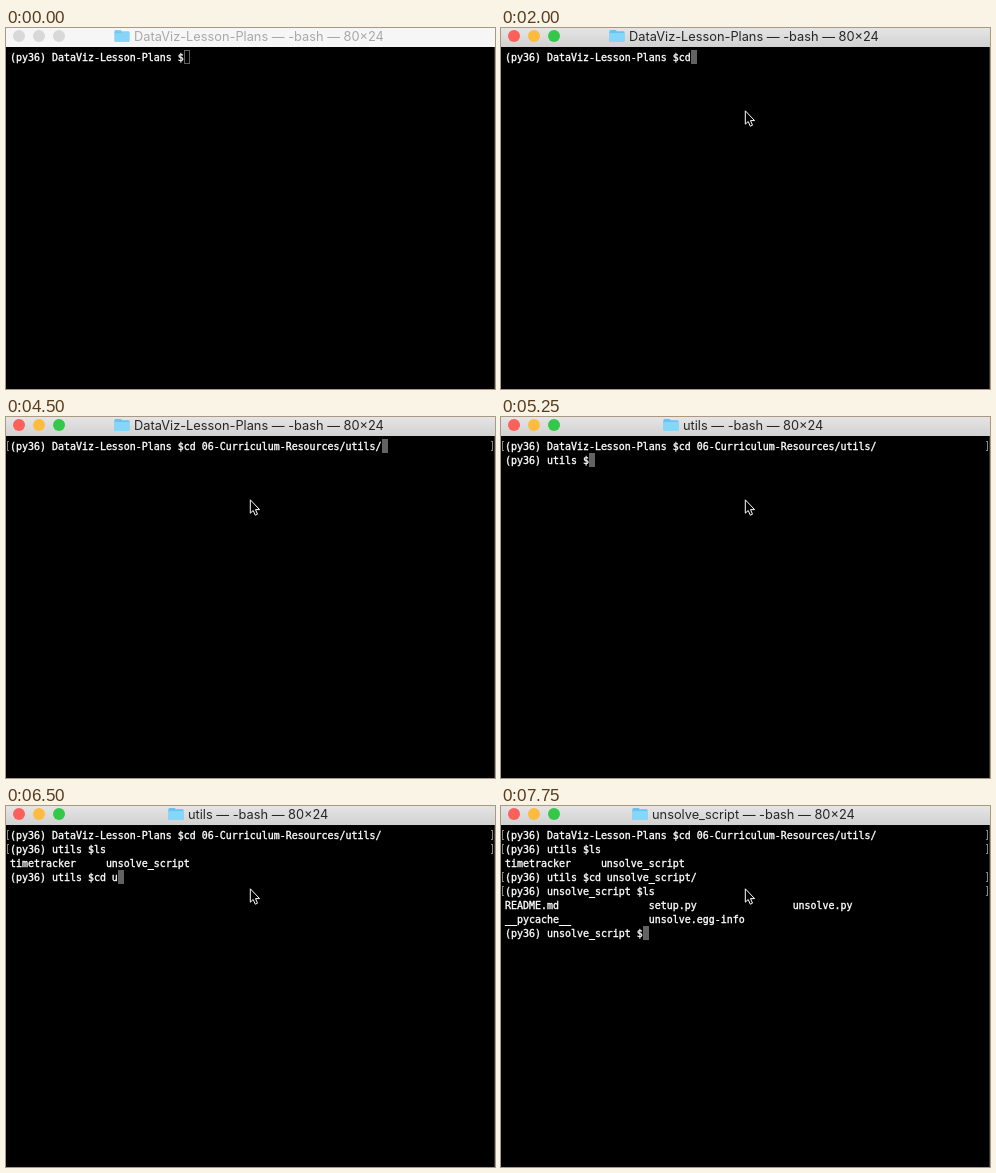
An HTML page with a canvas for the animation above (8000 ms loop, 489 px wide and 361 px high).

```html
<!DOCTYPE html>
<html>
<head>
<meta charset="utf-8">
<style>
  html, body { margin: 0; height: 100%; overflow: hidden; background: #000; }
  canvas { display: block; }
</style>
</head>
<body>
<canvas id="stage" width="489" height="361"></canvas>
<script>
const ctx = document.getElementById('stage').getContext('2d');
const LOOP = 8000, CELL = 6, ROW = 14, LEFT = 4, TOP = 22;

const home = '(py36) DataViz-Lesson-Plans $';
const utils = '(py36) utils $';
const script = '(py36) unsolve_script $';
const cdUtils = home + 'cd 06-Curriculum-Resources/utils/';
const listed = [cdUtils, utils + 'ls', 'timetracker     unsolve_script'];
const entered = [...listed, utils + 'cd unsolve_script/'];

// Each step: start time, terminal lines, rows that carry brackets
const steps = [
  [0, [home], []],
  [2000, [home + 'cd'], []],
  [2250, [home + 'cd '], []],
  [2500, [home + 'cd 0'], []],
  [2750, [home + 'cd 06'], []],
  [3500, [home + 'cd 06-Curriculum-Resources/'], [0]],
  [4250, [home + 'cd 06-Curriculum-Resources/ut'], [0]],
  [4500, [cdUtils], [0]],
  [5250, [cdUtils, utils], [0]],
  [5500, [cdUtils, utils + 'ls'], [0]],
  [5750, [...listed, utils], [0, 1]],
  [6250, [...listed, utils + 'cd'], [0, 1]],
  [6500, [...listed, utils + 'cd u'], [0, 1]],
  [6750, entered, [0, 1, 3]],
  [7250, [...entered, ''], [0, 1, 3]],
  [7500, [...entered, script + 'ls'], [0, 1, 3]],
  [7750, [...entered, script + 'ls',
    'README.md'.padEnd(24) + 'setup.py'.padEnd(24) + 'unsolve.py',
    '__pycache__'.padEnd(24) + 'unsolve.egg-info', script], [0, 1, 3, 4]]
];
const titles = [
  [0, 'DataViz-Lesson-Plans', 128],
  [5250, 'utils', 182],
  [7250, 'unsolve_script', 151]
];
const pointers = [[250, 314, 19], [500, 250, 68], [750, 243, 81]];

const at = (list, t) => list.filter(s => s[0] <= t).pop();

function rect(color, x, y, w, h, r = 0) {
  ctx.fillStyle = color;
  ctx.beginPath();
  ctx.roundRect(x, y, w, h, r);
  ctx.fill();
}

function titleBar(t, active) {
  const [, name, x] = at(titles, t);
  const shade = ctx.createLinearGradient(0, 0, 0, 19);
  shade.addColorStop(0, active ? '#e6e5e6' : '#f6f6f6');
  shade.addColorStop(1, active ? '#d2d1d2' : '#f6f6f6');
  rect(shade, 0, 0, 489, 19);

  ['#fc605b', '#fdbc40', '#34c84a'].forEach((color, i) =>
    rect(active ? color : '#d8d8d8', 7 + 20 * i, 2, 12, 12, 6));

  ctx.globalAlpha = active ? 1 : 0.75;
  rect('#69c3ee', x - 19.5, 2, 7, 4, 1);
  rect('#69c3ee', x - 19.5, 3.3, 15, 10.5, 1);
  rect('#84d6fa', x - 19.5, 5, 15, 9, 1);
  ctx.globalAlpha = 1;

  ctx.font = '12.8px Inter, Roboto, sans-serif';
  ctx.fillStyle = active ? '#262626' : '#a9a9a9';
  ctx.fillText(name + ' — -bash — 80×24', x, 13);
}

function terminal(t, active) {
  const [, lines, marked] = at(steps, t);
  const last = lines.length - 1;
  const x = LEFT + lines[last].length * CELL, y = TOP + last * ROW;
  ctx.strokeStyle = '#626262';
  ctx.lineWidth = 1;
  if (active) rect('#626262', x, y, CELL, ROW);
  else ctx.strokeRect(x + 0.5, y + 0.5, CELL - 1, ROW - 1);

  ctx.font = '9.966px "DejaVu Sans Mono", monospace';
  ctx.fillStyle = ctx.strokeStyle = '#fff';
  ctx.lineWidth = 0.35;
  lines.forEach((line, i) => {
    ctx.fillText(line, LEFT, TOP + 11 + i * ROW);
    ctx.strokeText(line, LEFT, TOP + 11 + i * ROW);
  });

  for (const row of marked) {
    const top = TOP + 2 + row * ROW;
    for (const [bar, tick] of [[1, 1], [486, 485]]) {
      rect('#858585', bar, top, 1, 10);
      rect('#858585', tick, top, 2, 1);
      rect('#858585', tick, top + 9, 2, 1);
    }
  }
}

const arrow = new Path2D('M1.3 1.8V15.2L4.2 12.5 6.3 17.2 8.5 16.2 6.5 11.6H10.6Z');

function pointer(t) {
  const spot = at(pointers, t);
  if (!spot) return;
  ctx.save();
  ctx.translate(spot[1], spot[2]);
  ctx.fillStyle = '#000';
  ctx.strokeStyle = '#fff';
  ctx.lineWidth = 1;
  ctx.fill(arrow);
  ctx.stroke(arrow);
  ctx.restore();
}

function draw(now) {
  const t = now % LOOP, active = t >= 750;
  rect('#000', 0, 0, 489, 361);
  rect('#333', 488, 19, 1, 342);
  titleBar(t, active);
  terminal(t, active);
  pointer(t);
  requestAnimationFrame(draw);
}
requestAnimationFrame(draw);
</script>
</body>
</html>
```
